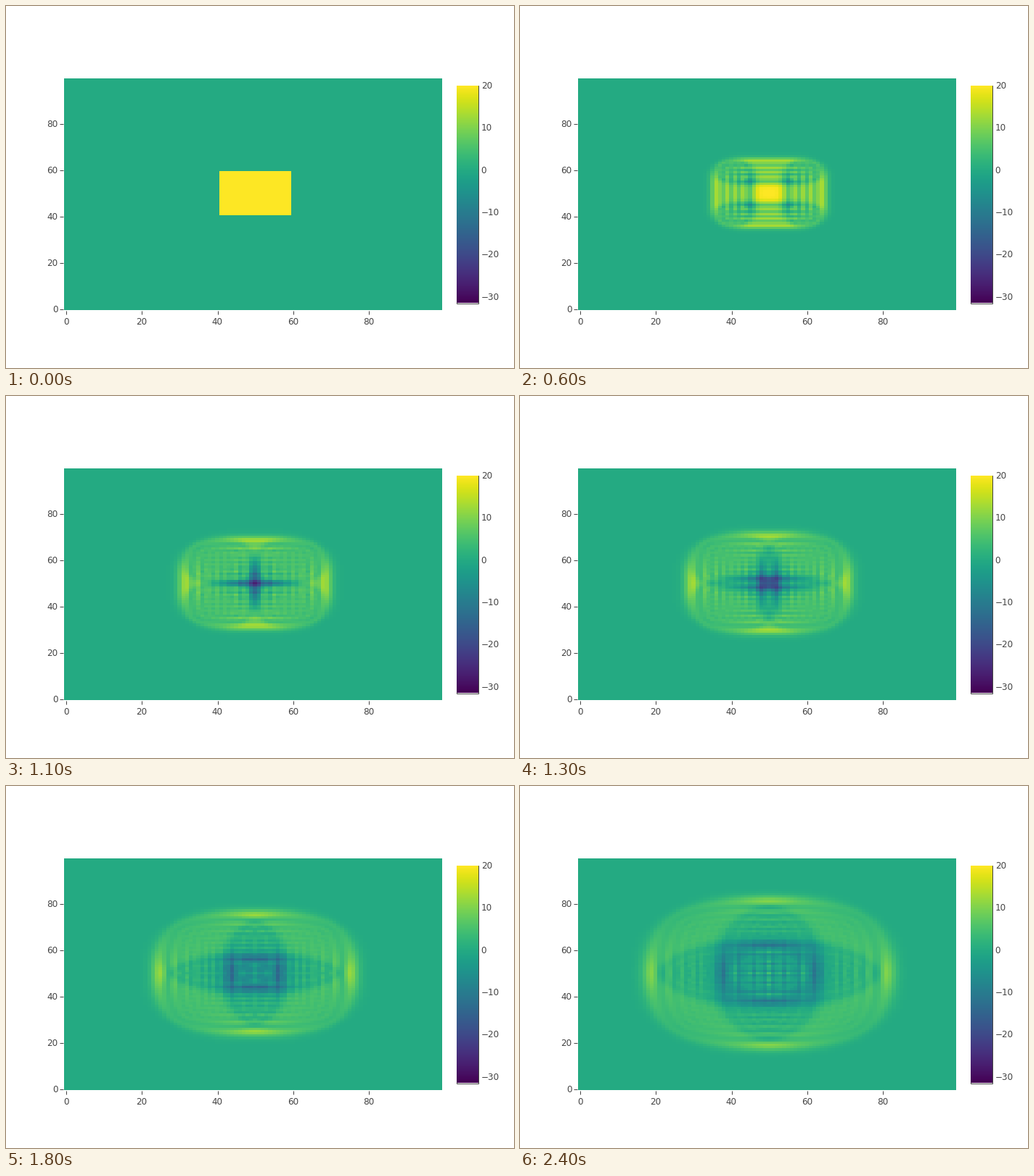
A matplotlib script that plays this animation: 700x500 px, repeating every 2500 ms.

```python
import numpy as np
import matplotlib.pyplot as plt
from matplotlib.animation import FuncAnimation
from matplotlib.patches import Rectangle

W, H, DPI = 700, 500, 100
LEFT, TOP, PW, PH = 80, 100, 521, 320      # heatmap box in pixels
N, FRAMES, STEPS = 100, 25, 2
COURANT2 = 0.25
INK = "#444444"

plt.rcParams["font.family"] = "DejaVu Sans"


def simulate():
    """Leapfrog wave equation, starting at rest from a raised square."""
    u = np.zeros((N, N))
    u[41:60, 41:60] = 20
    prev = u.copy()
    out = [u]
    for _ in range(FRAMES - 1):
        for _ in range(STEPS):
            lap = sum(np.roll(u, s, a) for s in (1, -1) for a in (0, 1)) - 4 * u
            u, prev = 2 * u - prev + COURANT2 * lap, u
        out.append(u)
    return np.array(out)


def cell_index(size):
    """Cell number under each pixel along one side."""
    edges = np.round(np.arange(N + 1) * size / N)
    return np.searchsorted(edges, np.arange(size), side="right") - 1


waves = simulate()
lo, hi = waves.min(), waves.max()
rows, cols = cell_index(PH)[::-1], cell_index(PW)


def picture(i):
    return waves[i][np.ix_(rows, cols)]


fig = plt.figure(figsize=(W / DPI, H / DPI), dpi=DPI, facecolor="white")
scale = dict(cmap="viridis", vmin=lo, vmax=hi, origin="upper")
heat = fig.figimage(picture(0), xo=LEFT, yo=H - TOP - PH, **scale)

BAR_X, BAR_Y, BAR_W, BAR_H = 621, 110, 30, 300
ramp = np.linspace(hi, lo, BAR_H)[:, None] * np.ones(BAR_W)
fig.figimage(ramp, xo=BAR_X, yo=H - BAR_Y - BAR_H, **scale)

ax = fig.add_axes([0, 0, 1, 1])
ax.set_xlim(0, W)
ax.set_ylim(H, 0)
ax.axis("off")

PX = 72 / DPI


def line(xs, ys):
    ax.plot(xs, ys, color=INK, lw=PX, solid_capstyle="butt")


def label(x, y, value, ha):
    ax.text(x, y, str(value).replace("-", "\u2212"), color=INK,
            fontsize=12 * PX, ha=ha, va="baseline")


for v in range(0, N, 20):
    x = LEFT + (v + 0.5) * PW / N
    y = TOP + PH - (v + 0.5) * PH / N
    tx, ty = np.floor(x) + 0.5, np.floor(y) + 0.5
    line([tx, tx], [421, 426])
    line([74, 79], [ty, ty])
    label(x, 440, v, "center")
    label(71.6, y + 4.3, v, "right")

for v in range(-30, 21, 10):
    label(654.7, BAR_Y + (hi - v) / (hi - lo) * BAR_H + 4.2, v, "left")

ax.add_patch(Rectangle((BAR_X - 0.5, BAR_Y - 0.5), BAR_W, BAR_H + 1,
                       fill=False, ec=INK, lw=PX))


def update(i):
    heat.set_data(picture(i))
    return [heat]


anim = FuncAnimation(fig, update, frames=FRAMES, interval=100,
                     repeat=True, repeat_delay=0, blit=False)
plt.show()
```
